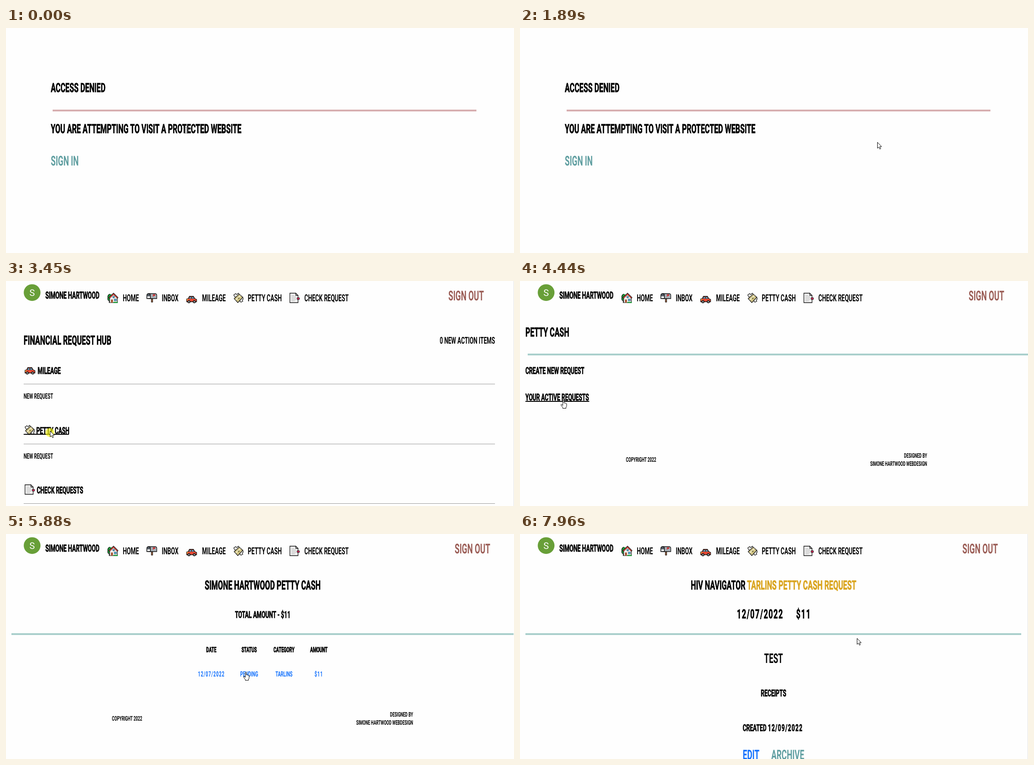
An HTML page that plays this animation: 1122 px wide and 499 px high, repeating every 8000 ms.

```html
<!DOCTYPE html>
<html lang="en">
<head>
<meta charset="utf-8">
<title>Request hub</title>
<style>
  html, body { margin: 0; width: 100%; height: 100%; overflow: hidden; background: #fefefe; }
  svg { display: block; }
  text { font-family: Roboto, "Liberation Sans", sans-serif; font-weight: 700; text-rendering: geometricPrecision; white-space: pre; }
  .bold { stroke: currentColor; stroke-width: .8; }
  .num { letter-spacing: .1em; }
  .line { fill: none; stroke: #111; stroke-width: 1.3; stroke-linejoin: round; stroke-linecap: round; }
  .ptr { fill: #fff; stroke: #000; stroke-width: 1; stroke-linejoin: round; }
</style>
</head>
<body>
<svg id="stage" width="1122" height="499" viewBox="0 0 1122 499">
  <defs>
    <g id="home">
      <circle cx="5.5" cy="8" r="5" fill="#1f9d3a"/><circle cx="4.5" cy="13" r="4" fill="#1f9d3a"/>
      <path class="line" d="M5 3Q0 5 1 12Q0 17 4 18V22"/>
      <path d="M5 11L13.5 3L22 11V22H5Z" fill="#f2f2f2" stroke="#111" stroke-width="1.2"/>
      <path d="M3.5 12L13.5 2.5L23 12" fill="none" stroke="#111" stroke-width="3.6"/>
      <path d="M4.5 11.5L13.5 3L22 11.5" fill="none" stroke="#e0483e" stroke-width="1.8"/>
      <path d="M8 15H12V22H8Z" fill="#a5502c"/>
      <path d="M15 14H20V18H15ZM12 8H15.5V11.5H12Z" fill="#45b4e8" stroke="#333" stroke-width=".7"/>
      <path d="M13 21.5H23" stroke="#1f9d3a" stroke-width="2.5"/>
    </g>
    <g id="mail">
      <path d="M11 14H14V22H11Z" fill="#9b5b35" stroke="#111"/>
      <path d="M5 3H19Q23 3 23 7V14H5Z" fill="#a9b1b8" stroke="#111" stroke-width="1.3"/>
      <path d="M1 14V7Q1 3 5 3T9 7V14Z" fill="#555d66" stroke="#111" stroke-width="1.3"/>
      <path d="M2 9H8V13H2Z" fill="#f6f6f6"/>
      <path d="M15 10V5H19V7.5H16" fill="#e23b3b" stroke="#b22" stroke-width="1"/>
    </g>
    <g id="car">
      <path d="M1 17V12L4.500 11L7 6H16L19 11L23 13V18H1Z" fill="#ea4b35" stroke="#111" stroke-width="1.3"/>
      <path d="M6 11L8 7.500H11V11ZM12.500 7.500H15.500L17.500 11H12.500Z" fill="#62c3ee" stroke="#222" stroke-width=".8"/>
      <path d="M1.500 13.500H4" stroke="#ffd23c" stroke-width="2"/>
      <circle cx="6" cy="18" r="2.500" fill="#aaa" stroke="#111" stroke-width="1.500"/>
      <circle cx="18" cy="18" r="2.500" fill="#aaa" stroke="#111" stroke-width="1.500"/>
    </g>
    <g id="cash">
      <path d="M1 5L5 2L8 4L11 1L14 5L9 10L3 9ZM15 9L21 10L22 14L20 16L21 19L17 21L13 17Z" fill="#f7f7f2" stroke="#111" stroke-width="1.2"/>
      <path d="M2 13L13 3L21 10L10 22Z" fill="#e9dda0" stroke="#111" stroke-width="1.3"/>
      <path d="M5 13L13 6L18 10L10 18.500Z" fill="none" stroke="#9c8f4e" stroke-width="1"/>
      <circle cx="11.500" cy="12" r="2.500" fill="#8c8349"/>
      <path d="M5 16L16 6" stroke="#f9f6df" stroke-width="1.500"/>
    </g>
    <g id="doc">
      <path d="M1 1H14L19 6V22H1Z" fill="#f4f4f4" stroke="#111" stroke-width="1.3"/>
      <path d="M14 1V6H19" class="line"/>
      <path d="M4 6H11M4 9H15M4 12H15M4 15H15M4 18H12" stroke="#aaa" stroke-width="1"/>
      <path d="M17 11H22V15H17Z" fill="#e3265e" stroke="#111" stroke-width="1"/>
    </g>
  </defs>
  <g id="pages"></g>
  <circle id="click" r="10" fill="#ff0"/>
  <g id="pointer">
    <g id="arrow"><path class="ptr" d="M.5 .5V13.700L3.500 11L5.700 15.600L7.800 14.600L5.700 10.100H9.700Z"/></g>
    <g id="hand"><path class="ptr" d="M.5 10.500V3.700Q.5 2.500 1.700 2.500T3 3.700V8.500Q5.300 7.500 5.400 9Q7.300 8.300 7.500 9.800Q9 9.400 9 11V14.500Q9 17 7.500 18V20.500H.5V18.500L-3.300 13.500Q-4 11.500-2.200 11.700L.5 14Z"/></g>
    <g id="beam"><path d="M-2.500-6.500H-1L0-5.500L1-6.500H2.500M-2.500 7.500H-1L0 6.500L1 7.500H2.500M0-5.500V6.500" fill="none" stroke="#555" stroke-width="1"/></g>
  </g>
</svg>
<script>
const LOOP = 8000;
const TEAL = '#5f9ea0', GOLD = '#daa520', BLUE = '#0d6efd', RULE = '#a9cfcc';
const CONDENSE = 0.58;
const $ = id => document.getElementById(id);

// ---- drawing helpers ----
const text = (x, y, size, str, o = {}) =>
  `<text transform="translate(${x} ${y}) scale(${CONDENSE} 1)" font-size="${size}"
    fill="${o.fill || '#000'}" color="${o.fill || '#000'}" text-anchor="${o.at || 'start'}"
    class="${o.cls || ''}">${str}</text>`;
const bold = (x, y, size, str, o = {}) => text(x, y, size, str, { ...o, cls: 'bold ' + (o.cls || '') });
const mid = { at: 'middle' }, end = { at: 'end' };
const bar = (x, y, w, h, fill) => `<rect x="${x}" y="${y}" width="${w}" height="${h}" fill="${fill}"/>`;
const icon = (id, x, y) => `<use href="#${id}" x="${x}" y="${y}"/>`;
const underline = (id, x, y, w) => `<g id="${id}">${bar(x, y, w, 2, id === 'signLine' ? TEAL : '#000')}</g>`;
const page = (id, body) => `<g id="${id}">${body}</g>`;

const PERSON = 'SIMONE HARTWOOD', FUND = 'TARLINS';

const nav = scrolls => `
  <circle cx="57.700" cy="25.700" r="18.500" fill="#689f38"/>
  <text x="57.700" y="33" font-size="20" style="font-weight:400" fill="#fff" text-anchor="middle">S</text>` +
  bold(87, 39, 21.6, PERSON) +
  icon('home', 224, 26) + text(258, 45, 21.6, 'HOME') +
  icon('mail', 310, 25) + text(344, 45, 21.6, 'INBOX') +
  icon('car', 398, 28) + text(433, 45, 21.6, 'MILEAGE') +
  icon('cash', 502, 26) + text(534, 45, 21.6, 'PETTY CASH') +
  icon('doc', 626, 26) + text(659, 45, 21.6, 'CHECK REQUEST') +
  text(scrolls ? 977 : 991, 43, 30, 'SIGN OUT', { fill: '#9b5d56' }) +
  (scrolls ? bar(1121, 0, 1, 499, '#e4e4e4') : '');

const footer = dy =>
  text(234, 401 + dy, 14.3, 'COPYRIGHT 2022') +
  text(899, 392 + dy, 14.1, 'DESIGNED BY', end) +
  text(899, 410 + dy, 14.1, PERSON + ' WEBDESIGN', end);

const hubRow = (y, id, x, label) =>
  icon(id, 41, y - 20) + bold(x, y, 21, label) +
  bar(39, y + 22, 1041, 1, '#999') + text(39, y + 55, 16.600, 'NEW REQUEST');

const columns = [[453.5, 'DATE', '12/07/2022'], [537, 'STATUS', 'PENDING'],
                 [614, 'CATEGORY', FUND], [691, 'AMOUNT', '$11']];
const cell = ([x, , value], i) =>
  text(x, 316, 16, value, { ...mid, fill: 'currentColor', cls: i % 3 ? '' : 'num' });

$('pages').innerHTML =
  page('denied',
    bold(99, 142, 28, 'ACCESS DENIED') + bar(103, 181, 936, 4, '#d7aeb0') +
    bold(99, 233, 28, 'YOU ARE ATTEMPTING TO VISIT A PROTECTED WEBSITE') +
    text(99, 305, 30, 'SIGN IN', { fill: TEAL }) + underline('signLine', 99, 309, 62)) +
  page('hub', nav(true) +
    bold(39, 141, 28, 'FINANCIAL REQUEST HUB') + text(1080, 139, 21, '0 NEW ACTION ITEMS', end) +
    hubRow(206, 'car', 70, 'MILEAGE') + hubRow(339, 'cash', 67, 'PETTY CASH') +
    hubRow(471, 'doc', 68, 'CHECK REQUESTS') + underline('cashLine', 39, 339, 100)) +
  page('petty', nav(false) +
    bold(12, 123, 27.800, 'PETTY CASH') + bar(17, 161, 1105, 4, RULE) +
    bold(12, 206, 21.100, 'CREATE NEW REQUEST') +
    bold(12, 265, 21.100, 'YOUR ACTIVE REQUESTS') + underline('activeLine', 12, 266, 141) + footer(0)) +
  page('list', nav(false) +
    bold(567, 123, 28, PERSON + ' PETTY CASH', mid) +
    bold(567, 186, 21, 'TOTAL AMOUNT - $11', mid) + bar(12, 220, 1109, 4, RULE) +
    columns.map(([x, head]) => bold(x, 262, 15.800, head, mid)).join('') +
    `<g id="row">${columns.map(cell).join('')}</g>` + footer(12.500)) +
  page('detail', nav(true) +
    bold(560, 123, 28, `HIV NAVIGATOR <tspan fill="${GOLD}" style="stroke:${GOLD}">${FUND} PETTY CASH REQUEST</tspan>`, mid) +
    bold(479, 187, 28, '12/07/2022', { cls: 'num' }) + bold(610, 187, 28, '$11', { cls: 'num' }) +
    bar(12, 220, 1095, 4, RULE) + text(560, 286, 29.500, 'TEST', mid) +
    bold(560, 360, 21, 'RECEIPTS', mid) +
    bold(492, 437, 21, 'CREATED <tspan class="num">12/09/2022</tspan>') +
    text(492, 500, 30, 'EDIT', { fill: BLUE }) + text(555, 500, 30, 'ARCHIVE', { fill: TEAL }));

// ---- timeline ----
const pageAt = [[0, 'denied'], [3030, 'hub'], [3520, 'petty'], [4660, 'list'], [7430, 'detail']];
const pointerAt = [[0, 'beam'], [140, 'arrow'], [340, 'hand'], [890, 'arrow'],
                   [3930, 'hand'], [4660, 'arrow'], [5340, 'hand'], [7430, 'arrow']];
// start, end, number of steps, target x, target y
const moves = [
  [70, 340, 5, 125, 289], [890, 1230, 6, 788, 249], [1890, 1890, 1, 789, 253],
  [2440, 2510, 2, 772, 245], [2580, 2700, 3, 831, 224], [3030, 3310, 5, 97, 332],
  [3720, 4000, 5, 94, 262], [4860, 5270, 7, 421, 294], [5340, 5610, 5, 503, 304],
  [5740, 5880, 3, 528, 304], [7430, 7630, 4, 747, 226], [7890, 7960, 2, 744, 231]
];
// start, end
const clicks = [[410, 690], [1960, 2300], [3380, 3520], [4070, 4440], [7150, 7430]];

const current = (table, t) => table.filter(([from]) => t >= from).pop()[1];
const within = (t, a, b) => t >= a && t < b;
const show = (id, on) => $(id).setAttribute('display', on ? 'inline' : 'none');
const ease = p => p * p * (3 - 2 * p);

function position(t) {
  let x = 398, y = 226;
  for (const [start, stop, n, tx, ty] of moves) {
    if (t < start) break;
    const step = stop > start ? Math.floor((t - start) / (stop - start) * (n - 1) + 1e-6) + 1 : n;
    const p = ease(Math.min(step / n, 1));
    x += (tx - x) * p;
    y += (ty - y) * p;
  }
  return [x, y];
}

function glow(t) {
  const hit = clicks.find(([a, b]) => within(t, a, b));
  if (!hit) return 0;
  const p = Math.floor((t - hit[0]) / 70) * 70 / 400;
  return 0.62 * (1 - p * p);
}

function draw(t) {
  const now = current(pageAt, t), kind = current(pointerAt, t);
  for (const [, id] of pageAt) show(id, id === now);
  for (const id of ['arrow', 'hand', 'beam']) show(id, id === kind);
  show('signLine', within(t, 340, 890));
  show('cashLine', t >= 3310);
  show('activeLine', t >= 3930);
  $('row').style.color = t >= 5340 ? BLUE : GOLD;
  const [x, y] = position(t);
  $('pointer').setAttribute('transform', `translate(${x} ${y})`);
  $('click').setAttribute('transform', `translate(${x} ${y + 4})`);
  $('click').setAttribute('opacity', glow(t));
}

const began = performance.now();
function tick() {
  draw((performance.now() - began) % LOOP);
  requestAnimationFrame(tick);
}
tick();
</script>
</body>
</html>
```
